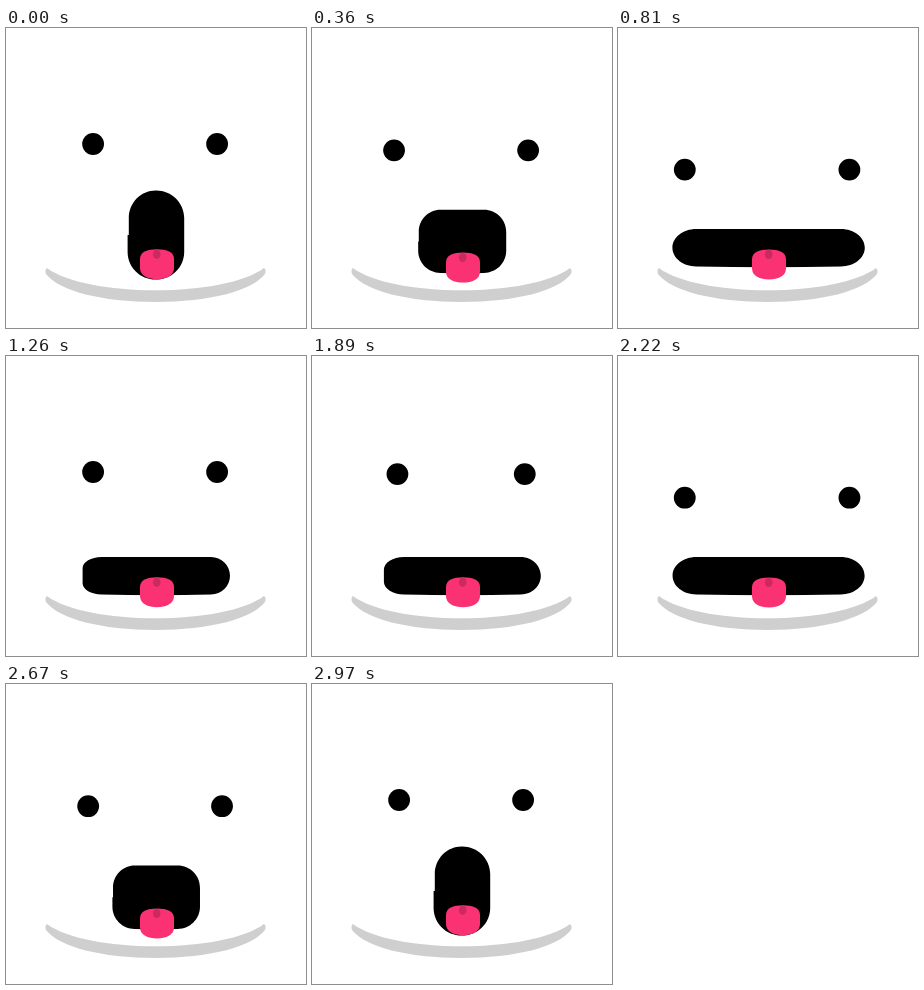
An HTML page with a canvas for the animation above (3.03 s loop, 300 by 300 pixels).

```html
<!DOCTYPE html>
<html lang="en">
<head>
<meta charset="utf-8">
<title>Singing face</title>
<style>
  html, body { margin: 0; width: 100%; height: 100%; overflow: hidden; background: #fff; }
  canvas { display: block; width: 300px; height: 300px; }
</style>
</head>
<body>
<canvas id="stage" width="300" height="300"></canvas>
<script>
const ctx = document.getElementById('stage').getContext('2d');
const LOOP = 3030;
const CURVE = 0.5523;

const clamp = v => Math.min(1, Math.max(0, v));
const mix = (a, b, p) => a + (b - a) * p;

function ease(t, from, to) {
  const u = clamp((t - from) / (to - from));
  return u * u * (3 - 2 * u);
}

// left, right, top, bottom, left/right corner width, left/right straight half height, notch, sag
const MOUTH = {
  round:  [121.6, 178.2, 162.4, 251.6, 28, 28, 17, 17, 1.2, 0],
  narrow: [91, 210, 201, 238.4, 16.5, 16.5, 2, 2, 0, 0.8],
  wide:   [53.2, 248, 201, 238.4, 24, 24, 0, 0, 0, 0.8],
  smile:  [76.6, 224, 201, 238.4, 19, 19, 7.5, 0, 0, 0.8]
};

function mouthAt(t) {
  const blend = (a, b, p) => a.map((v, i) => mix(v, b[i], p));
  if (t < 570) return blend(MOUTH.round, MOUTH.narrow, ease(t, 150, 570));
  if (t < 840) return blend(MOUTH.narrow, MOUTH.wide, ease(t, 570, 840));
  return blend(MOUTH.wide, MOUTH.smile, ease(t, 840, 1260));
}

// Quarter-oval from (x0, y0) to (x1, y1), leaving vertically or horizontally
function corner(x0, y0, x1, y1, vertical) {
  const dx = (x1 - x0) * CURVE, dy = (y1 - y0) * CURVE;
  if (vertical) ctx.bezierCurveTo(x0, y0 + dy, x1 - dx, y1, x1, y1);
  else ctx.bezierCurveTo(x0 + dx, y0, x1, y1 - dy, x1, y1);
}

function drawMouth([l, r, top, bottom, wl, wr, fl, fr, notch, sag]) {
  const cy = (top + bottom) / 2;
  const ul = l + notch;
  ctx.fillStyle = '#000';
  ctx.beginPath();
  ctx.moveTo(ul, cy);
  ctx.lineTo(ul, cy - fl);
  corner(ul, cy - fl, l + wl, top, true);
  ctx.lineTo(r - wr, top);
  corner(r - wr, top, r, cy - fr, false);
  ctx.lineTo(r, cy + fr);
  corner(r, cy + fr, r - wr, bottom, true);
  ctx.quadraticCurveTo((l + r) / 2, bottom + sag * 2, l + wl, bottom);
  corner(l + wl, bottom, l, cy + fl, false);
  ctx.lineTo(l, cy);
  ctx.closePath();
  ctx.fill();
}

function drawTongue(dy) {
  ctx.save();
  ctx.translate(151, 221 + dy);
  ctx.fillStyle = '#fa3173';
  ctx.beginPath();
  ctx.moveTo(-17, 10);
  ctx.bezierCurveTo(-17, 3, -10, 0.2, 0, 0.2);
  ctx.bezierCurveTo(10, 0.2, 17, 3, 17, 10);
  ctx.lineTo(17, 19);
  ctx.bezierCurveTo(17, 27, 9, 30.2, 0, 30.2);
  ctx.bezierCurveTo(-9, 30.2, -17, 27, -17, 19);
  ctx.closePath();
  ctx.fill();
  ctx.fillStyle = '#cb2a60';
  ctx.beginPath();
  ctx.ellipse(-0.3, 5.2, 3.8, 4.6, 0, 0, Math.PI * 2);
  ctx.fill();
  ctx.restore();
}

function drawChin() {
  ctx.fillStyle = '#cfcfcf';
  ctx.beginPath();
  ctx.moveTo(41, 240);
  ctx.bezierCurveTo(60, 254.5, 104, 262.3, 149.5, 262.3);
  ctx.bezierCurveTo(195, 262.3, 239, 254.5, 258, 240);
  ctx.quadraticCurveTo(260.5, 242, 259, 246);
  ctx.bezierCurveTo(246, 263, 203, 274, 149.5, 274);
  ctx.bezierCurveTo(96, 274, 53, 263, 40, 246);
  ctx.quadraticCurveTo(38.5, 242, 41, 240);
  ctx.fill();
}

function drawEyes(p) {
  const x = 62 + 20.6 * p, y = 116 + 26 * p;
  ctx.fillStyle = '#000';
  for (const side of [-1, 1]) {
    ctx.beginPath();
    ctx.arc(149.1 + side * x, y, 10.9, 0, Math.PI * 2);
    ctx.fill();
  }
}

function draw(now) {
  const time = now % LOOP;
  const t = Math.min(time, LOOP - time);   // second half plays backwards
  ctx.fillStyle = '#fff';
  ctx.fillRect(0, 0, 300, 300);
  drawChin();
  drawEyes(ease(t, 200, 700) - ease(t, 780, 1215));
  drawMouth(mouthAt(t));
  drawTongue(8 * (ease(t, 190, 570) - ease(t, 570, 840)));
}

const start = performance.now();
function tick() {
  draw(performance.now() - start);
  requestAnimationFrame(tick);
}
tick();
</script>
</body>
</html>
```
